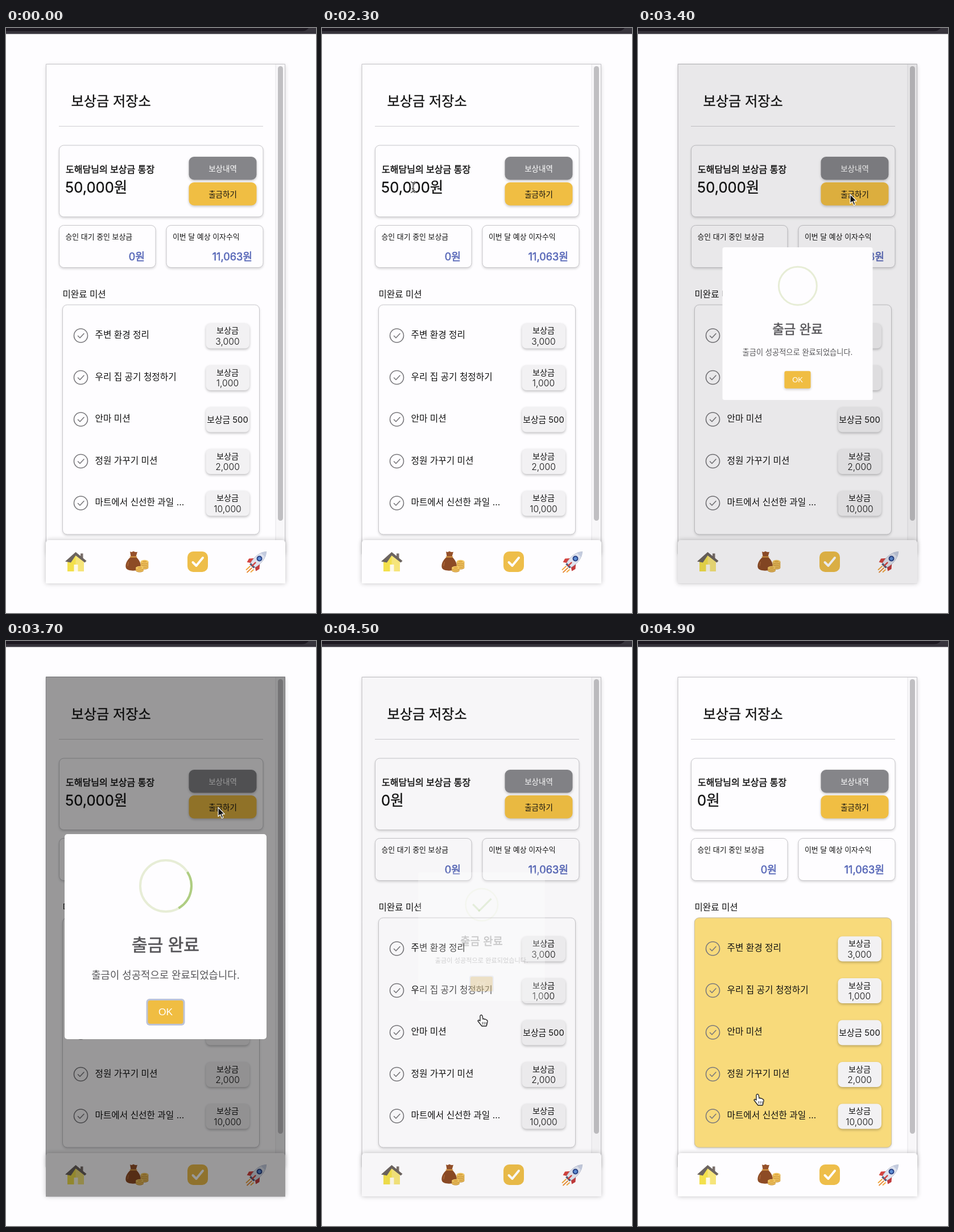
An HTML page with a canvas that plays this animation: 545x1027 px, repeating every 5 s.

```html
<!DOCTYPE html>
<html lang="ko">
<head>
<meta charset="utf-8">
<title>보상금 저장소</title>
<style>
html, body { margin: 0; width: 100%; height: 100%; overflow: hidden; background: #fefdff; }
canvas { display: block; width: 545px; height: 1027px; }
</style>
</head>
<body>
<canvas id="stage"></canvas>
<script>
const W = 545, H = 1027, LOOP = 5000, STEP = 100;
const OPEN = 3384, CLOSE = 4433, HOVER = 4590;
const SANS = 'Inter, "Noto Sans CJK KR", "Noto Sans CJK", sans-serif';
const cv = document.getElementById('stage');
const c = cv.getContext('2d');
const dpr = window.devicePixelRatio || 1;
cv.width = W * dpr;
cv.height = H * dpr;

const missions = [
  ['주변 환경 정리', '3,000'],
  ['우리 집 공기 청정하기', '1,000'],
  ['안마 미션', '500'],
  ['정원 가꾸기 미션', '2,000'],
  ['마트에서 신선한 과일 ...', '10,000']
];

// ---------- timing ----------
const clamp = x => Math.min(1, Math.max(0, x));

function bezier(x1, y1, x2, y2) {
  const at = (s, a, b) => 3 * s * (1 - s) * (1 - s) * a + 3 * s * s * (1 - s) * b + s * s * s;
  return x => {
    if (x <= 0) return 0;
    if (x >= 1) return 1;
    let lo = 0, hi = 1;
    for (let i = 0; i < 24; i++) {
      const mid = (lo + hi) / 2;
      if (at(mid, x1, x2) < x) lo = mid; else hi = mid;
    }
    return at((lo + hi) / 2, y1, y2);
  };
}
const ease = bezier(.25, .1, .25, 1);
const easeIn = bezier(.42, 0, 1, 1);
const easeInOut = bezier(.42, 0, .58, 1);

// keys: [time, ...values]
function track(t, keys, fn = ease) {
  let i = 0;
  while (i < keys.length - 2 && t >= keys[i + 1][0]) i++;
  const a = keys[i], b = keys[i + 1];
  const k = fn((t - a[0]) / (b[0] - a[0]));
  return a.slice(1).map((v, n) => v + (b[n + 1] - v) * k);
}

// ---------- drawing helpers ----------
function text(s, x, y, size, { color = '#111', align = 'left', bold = 0, weight = 400, font = SANS } = {}) {
  c.font = `${weight} ${size}px ${font}`;
  c.textAlign = align;
  c.fillStyle = c.strokeStyle = color;
  c.fillText(s, x, y + size * .37);
  if (bold) {
    c.lineWidth = bold;
    c.lineJoin = 'round';
    c.strokeText(s, x, y + size * .37);
  }
}

function box(x, y, w, h, r, fill, { border, shadow, blur = 4, dy = 2 } = {}) {
  c.save();
  c.beginPath();
  c.roundRect(x, y, w, h, r);
  if (shadow) {
    c.shadowColor = shadow;
    c.shadowBlur = blur * dpr;
    c.shadowOffsetY = dy * dpr;
  }
  c.fillStyle = fill;
  c.fill();
  c.restore();
  if (border) {
    c.strokeStyle = border;
    c.lineWidth = 1;
    c.stroke();
  }
}

function poly(pts, fill) {
  c.beginPath();
  for (let i = 0; i < pts.length; i += 2) c.lineTo(pts[i], pts[i + 1]);
  c.closePath();
  c.fillStyle = fill;
  c.fill();
}

function line(pts, color, width, cap = 'round') {
  c.beginPath();
  for (let i = 0; i < pts.length; i += 2) c.lineTo(pts[i], pts[i + 1]);
  c.strokeStyle = color;
  c.lineWidth = width;
  c.lineCap = cap;
  c.lineJoin = 'round';
  c.stroke();
}

function oval(x, y, rx, ry, fill) {
  c.beginPath();
  c.ellipse(x, y, rx, ry, 0, 0, 7);
  c.fillStyle = fill;
  c.fill();
}

function shape(d, fill, stroke, width = 1) {
  const p = new Path2D(d);
  c.fillStyle = fill;
  c.fill(p);
  if (stroke) {
    c.strokeStyle = stroke;
    c.lineWidth = width;
    c.lineJoin = 'round';
    c.stroke(p);
  }
}

// ---------- page ----------
function card(x, y, w, h) {
  box(x, y, w, h, 8, '#fefdff', { border: '#c8c7cb', shadow: 'rgba(0,0,0,.18)' });
}

function mission(i, [name, reward]) {
  const y = 540 + 73.5 * i;
  c.beginPath();
  c.arc(131.5, y, 12, 0, 7);
  c.strokeStyle = '#79787c';
  c.lineWidth = 1.6;
  c.stroke();
  line([126.5, y + .5, 130, y + 4, 137, y - 3.5], '#79787c', 1.6);
  text(name, 156.5, y - 1.5, 15.7);

  box(351.5, y - 21.5, 76.5, 44, 8, '#f2f1f3', { shadow: 'rgba(0,0,0,.25)' });
  const mid = { align: 'center' };
  if (reward.length < 4) {
    text('보상금 ' + reward, 389.5, y + .5, 14.8, mid);
  } else {
    text('보상금', 389.5, y - 9, 14.2, mid);
    text(reward, 389.5, y + 10, 15.7, { ...mid, weight: 300 });
  }
}

function house() {
  poly([108, 936, 122.5, 924, 137, 936, 137, 954, 108, 954], '#f3e04c');
  poly([122.5, 924, 137, 936, 137, 954, 122.5, 954], '#f6e57b');
  c.fillStyle = '#fdf9ea';
  c.fillRect(119.5, 942, 7, 12);
  c.fillStyle = '#7a706c';
  c.fillRect(131, 922.5, 4.5, 9);
  poly([122.5, 920, 141.5, 935.5, 138.5, 938.5, 122.5, 926, 114, 938.5, 104, 936.5], '#6c6460');
}

function coins(x, y, n) {
  for (let i = 0; i < n; i++) {
    oval(x, y - i * 3, 7, 3.6, '#c98f35');
    oval(x, y - i * 3 - 1, 7, 3.3, '#f3ca66');
  }
  oval(x, y - n * 3 + 2, 4, 1.7, '#e0a944');
}

function moneyBag() {
  shape('M219 929 C212 934 209 943 211 948 C213 954 232 954 236 949 C239 943 235 934 229 929 Z', '#8d4b25');
  shape('M218 919 Q221 921 224 918.5 Q228 921 231 919.5 L228.5 928 L219.5 928 Z', '#96512a');
  line([218.5, 928.5, 229.5, 928.5], '#d89a45', 2);
  line([215, 938, 214, 944], '#a96537', 1.8);
  coins(243.5, 947, 4);
  coins(235, 952, 2);
}

function checkTile() {
  box(319, 919, 36, 36, 10, '#eebe4a');
  line([328.5, 938, 334.5, 944, 346, 930], '#fff', 4);
}

function rocket() {
  line([429, 945, 422.5, 951], '#efa53c', 1.8);
  line([432, 948, 424, 955.5], '#e98b35', 1.8);
  line([435, 951, 430.5, 955], '#efa53c', 1.8);
  c.save();
  c.translate(442, 935);
  c.rotate(Math.PI / 4);
  shape('M-6 0 L-13 8 L-11 15 L-5 11 Z', '#d4433f');
  shape('M6 0 L13 8 L11 15 L5 11 Z', '#c23a3b');
  shape('M0 -22 C8 -14 9 2 5 13 L-5 13 C-9 2 -8 -14 0 -22 Z', '#dfe3ee', '#a9b0c3', .7);
  shape('M0 -22 C3 -19 4.5 -16.5 5.5 -14 L-5.5 -14 C-4.5 -16.5 -3 -19 0 -22 Z', '#c3cbde');
  c.fillStyle = '#55607c';
  c.fillRect(-5, 11, 10, 3.5);
  oval(0, -5, 5, 5, '#2c4588');
  oval(0, -5, 2.8, 2.8, '#5f8fd6');
  line([0, 5, 0, 13], '#d4433f', 2.4);
  c.restore();
}

function browserBar() {
  c.fillStyle = '#37343c';
  c.fillRect(0, 0, W, 10.5);
  shape('M0 0 H532 Q528 5.5 520 5.5 H0 Z', '#1c1820');
}

function page(t) {
  c.fillStyle = '#fefdff';
  c.fillRect(0, 0, W, H);
  browserBar();

  box(70.5, 63.5, 420, 860, 0, '#fefdff', { border: '#c4c3c7', shadow: 'rgba(0,0,0,.2)', blur: 7, dy: 1 });
  c.fillStyle = '#f8f7f9';
  c.fillRect(474, 64, 16, 850);
  line([474, 64, 474, 900], '#e6e5e8', 1, 'butt');
  box(478, 67, 9, 798, 4.5, '#c0bfc2');

  text('보상금 저장소', 114.5, 128, 24.2, { bold: .3 });
  line([93, 172.5, 452, 172.5], '#cfced2', 1.2, 'butt');

  card(93.5, 206, 358.5, 125.5);
  text('도해담님의 보상금 통장', 105, 248.5, 16, { bold: .5 });
  text(t < CLOSE ? '50,000원' : '0원', 104, 280, 25.6, { bold: .3 });
  const lift = { shadow: 'rgba(0,0,0,.22)' };
  box(321.5, 226, 119, 40.5, 9, '#858589', lift);
  box(321.5, 271, 119, 40.5, 9, '#f0be43', lift);
  text('보상내역', 381, 247, 13.5, { color: '#fff', align: 'center' });
  text('출금하기', 381, 292, 13.5, { align: 'center' });

  const sum = { color: '#5868b8', align: 'right', bold: .6 };
  card(93.5, 346.5, 169.5, 74);
  card(282, 346.5, 170, 74);
  text('승인 대기 중인 보상금', 104.5, 366.5, 12.9);
  text('이번 달 예상 이자수익', 293, 366.5, 12.9);
  text('0원', 244, 401, 18.2, sum);
  text('11,063원', 433, 401, 18.2, sum);

  text('미완료 미션', 99.5, 467, 15.6);
  card(99.5, 486, 346, 403);
  c.globalAlpha = clamp((t - HOVER) / 200);
  box(99.5, 486, 346, 403, 8, '#f8da7b', { border: '#cdc19a' });
  c.globalAlpha = 1;
  missions.forEach((m, i) => mission(i, m));

  box(70, 899, 421, 76, [5, 5, 0, 0], '#fefdff', { shadow: 'rgba(0,0,0,.24)', blur: 9, dy: 0 });
  house();
  moneyBag();
  checkTile();
  rocket();
}

// ---------- dialog ----------
function successIcon(age) {
  const em = 17, rad = Math.PI / 180;
  c.save();
  c.translate(.5, -89);
  c.lineWidth = 4;
  c.lineCap = 'butt';

  // a half mask turns once and uncovers part of the solid ring
  const turn = 360 * easeIn((age - 212) / 298);
  if (turn > 0 && turn < 360) {
    const from = turn <= 180 ? 28 - turn : -135;
    const to = turn <= 180 ? 60 : 225 - turn;
    c.beginPath();
    c.arc(0, 0, 45, from * rad, to * rad);
    c.strokeStyle = '#aed086';
    c.stroke();
  }
  c.beginPath();
  c.arc(0, 0, 45, 0, 7);
  c.strokeStyle = 'rgba(174,200,120,.3)';
  c.stroke();

  const p = age / 750;
  const [left, tipTop, tipW] = track(p, [
    [0, .0625, 1.1875, 0], [.54, .0625, 1.1875, 0], [.7, -.375, 2.1875, 3.125],
    [.84, 1.3125, 3, 1.0625], [1, .8125, 2.8125, 1.5625]]);
  const [right, longTop, longW] = track(p, [
    [0, 2.875, 3.375, 0], [.65, 2.875, 3.375, 0], [.84, 0, 2.1875, 3.4375], [1, .5, 2.375, 2.9375]]);
  const bar = (x, y, w, dir) => {
    if (w < .02) return;
    const d = w * .3536;
    line([x - d, y - d * dir, x + d, y + d * dir].map(v => (v - 2.5) * em), '#a9cd80', .3 * em, 'butt');
  };
  bar(left + tipW / 2, tipTop + .156, tipW, 1);
  bar(5 - right - longW / 2, longTop + .156, longW, -1);
  c.restore();
}

function dialog(t) {
  const age = t - OPEN, out = t - CLOSE;
  if (age < 0 || out > 150) return;

  const dim = .4 * (ease(age / 100) - ease(out / 100));
  c.fillStyle = `rgba(0,0,0,${dim})`;
  c.fillRect(70, 62.5, 421, 913);

  const hide = ease(out / 150);
  const [grow] = track(age / 300, [[0, .7], [.45, 1.05], [.8, .95], [1, 1]]);
  const scale = grow * (1 - .5 * hide);
  c.save();
  c.globalAlpha = 1 - hide;
  c.translate(280.5, 519);
  c.scale(scale, scale);
  box(-177.5, -180, 355, 360, 5, '#fefdff');
  successIcon(age);
  const mid = { align: 'center', color: '#565558' };
  text('출금 완료', 0, 13.5, 30, { ...mid, bold: .7 });
  text('출금이 성공적으로 완료되었습니다.', 0, 67, 17.8, mid);
  if (age > 60) box(-34, 109, 68, 47, 6, '#bcc3d8');
  box(-31, 112, 62, 41, 4, '#f0bd42', { shadow: age > 60 ? '' : 'rgba(0,0,0,.2)' });
  text('OK', 0, 132, 17.4, { align: 'center', color: '#fff', font: '"Liberation Sans", Arial, sans-serif' });
  c.restore();
}

// ---------- pointer ----------
function pointer(t) {
  if (t < 2300) return;
  const [x, y] = track(t, [
    [2300, 160, 279], [2600, 320, 302], [2800, 390, 293], [3000, 373, 292], [3800, 373, 292],
    [4200, 280, 657], [4500, 280, 657], [4900, 210, 796], [5000, 210, 796]], easeInOut);
  c.save();
  c.translate(x, y);
  if (y < 290 && x < 216) {
    const beam = [[-3.5, -9, 0, -7, 3.5, -9], [0, -7, 0, 8], [-3.5, 10, 0, 8, 3.5, 10], [-2, 3, 2, 3]];
    beam.forEach(b => line(b, '#fff', 2.6));
    beam.forEach(b => line(b, '#222', 1.2));
  } else if (y > 628) {
    shape('M-2 1 Q0 -2 2 1 L3 7 Q5 5 6 7.5 Q8 6 9 8.5 Q11 8 11 11 L10 16 L9 19 H1 L-3 14 L-6 10 Q-5 7 -2 10 Z',
      '#fff', '#1b1b1d', 1.3);
    [2, 5, 8].forEach(v => line([v, 12, v + .3, 16], '#1b1b1d', .9));
  } else {
    shape('M0 0 V16 L3.7 12.6 L6.4 19 L9 18 L6.4 11.8 H11.3 Z', '#111', '#fff', 1.2);
  }
  c.restore();
}

function frame(now) {
  const t = Math.floor(now % LOOP / STEP) * STEP;
  c.setTransform(dpr, 0, 0, dpr, 0, 0);
  page(t);
  dialog(t);
  pointer(t);
  requestAnimationFrame(frame);
}
requestAnimationFrame(frame);
</script>
</body>
</html>
```
